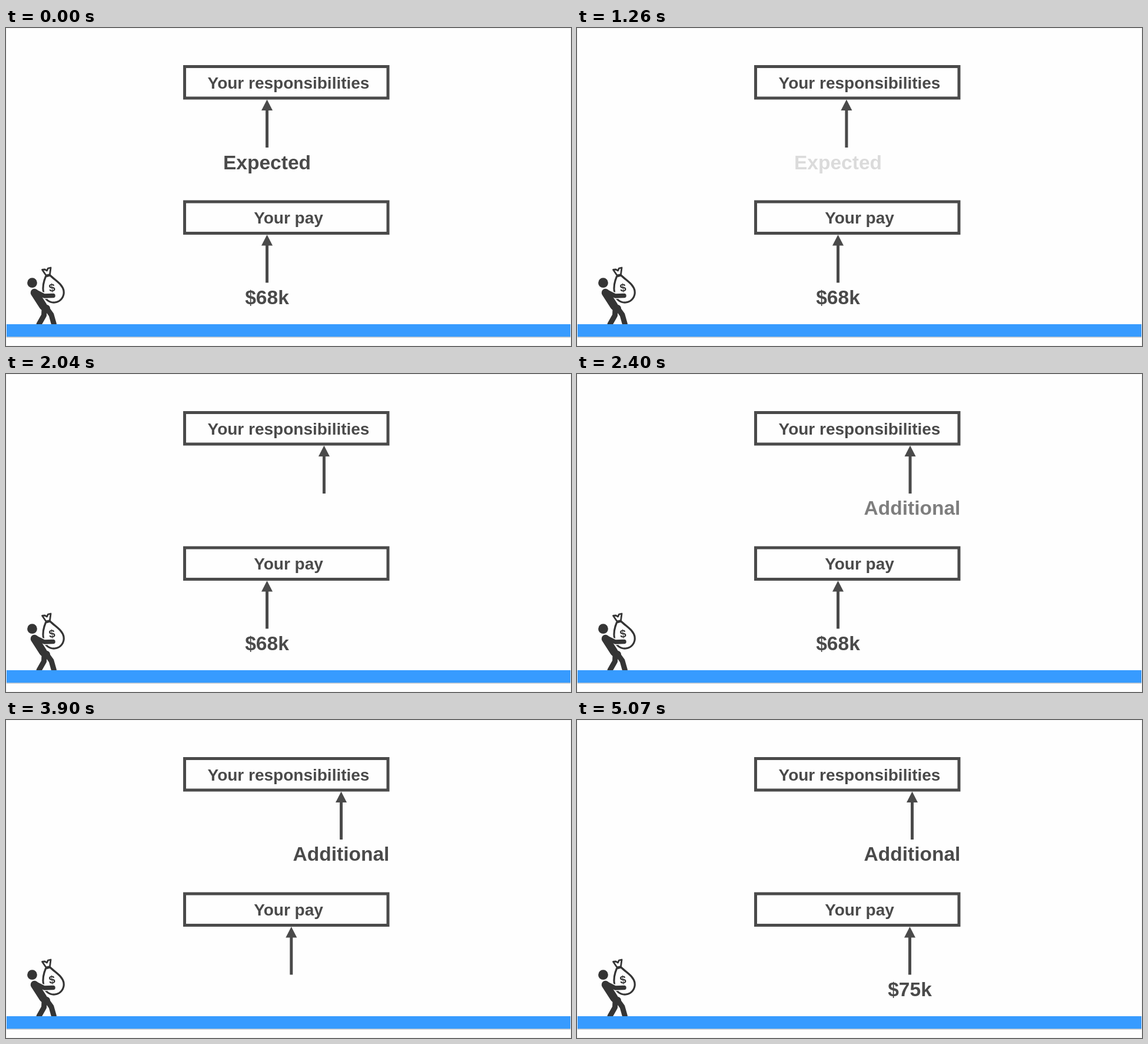
Write an HTML page with a canvas that moves like this. It is 960 by 540 pixels and loops after 5.79 s.

```html
<!DOCTYPE html>
<html lang="en">
<head>
<meta charset="utf-8">
<title>Responsibilities and pay</title>
<style>
  html, body { margin: 0; width: 100%; height: 100%; overflow: hidden; background: #fefefe; }
  canvas { display: block; width: 960px; height: 540px; }
</style>
</head>
<body>
<canvas id="stage" width="960" height="540"></canvas>
<script>
const ctx = document.getElementById('stage').getContext('2d');
const LOOP = 5790;
const INK = '#4a4a4a';
const FIGURE = '#353535';
const PAPER = '#fefefe';
const FONT = '"Liberation Sans", Arial, Helvetica, sans-serif';

// Sine ease in and out, 0 before start and 1 after end
function ease(t, start, end) {
  const u = Math.min(1, Math.max(0, (t - start) / (end - start)));
  return (1 - Math.cos(Math.PI * u)) / 2;
}

const mix = (a, b, u) => a + (b - a) * u;

function label(text, x, y, size, alpha = 1) {
  if (alpha <= 0) return;
  ctx.globalAlpha = alpha;
  ctx.fillStyle = INK;
  ctx.font = `bold ${size}px ${FONT}`;
  ctx.textAlign = 'center';
  ctx.fillText(text, x, y);
  ctx.globalAlpha = 1;
}

function box(text, top) {
  ctx.strokeStyle = INK;
  ctx.lineWidth = 5;
  ctx.lineJoin = 'miter';
  ctx.strokeRect(303.5, top + 2.5, 345.5, 53.5);
  label(text, 480, top + 39.5, 28);
}

function arrow(x, tip) {
  ctx.fillStyle = INK;
  ctx.fillRect(x - 2.5, tip + 17, 5, 64.5);
  ctx.beginPath();
  ctx.moveTo(x, tip);
  ctx.lineTo(x + 9.5, tip + 18.5);
  ctx.lineTo(x - 9.5, tip + 18.5);
  ctx.fill();
}

function line(path, width, color) {
  ctx.strokeStyle = color;
  ctx.lineWidth = width;
  ctx.stroke(new Path2D(path));
}

function bag() {
  line('M67.5 422 C64 430 62 440 63.5 449 C65 461 74 467 83 466 C93 465 99.5 456 98 446 C96 435 84 429 75 420 Z', 3.2, FIGURE);
  line('M68 420 L61.5 410.5 L66 410 L69.5 412 L71.5 408 L76 407 L74.5 418.5 Z', 2.8, FIGURE);
  ctx.save();
  ctx.translate(78, 441);
  ctx.rotate(-0.14);
  ctx.fillStyle = FIGURE;
  ctx.font = `bold 19px ${FONT}`;
  ctx.textAlign = 'center';
  ctx.fillText('$', 0, 6.5);
  ctx.restore();
}

function carrier() {
  ctx.lineJoin = ctx.lineCap = 'round';
  bag();
  const arm = 'M50 447.5 L65 455 L80 454.5';
  line(arm, 10.5, PAPER);
  line('M49 450 L63 472', 16, PAPER);
  line(arm, 7.5, FIGURE);
  line('M48.5 449.5 L63 472', 13.5, FIGURE);
  line('M64 474 L69 476', 12, FIGURE);
  line('M65 477 L64.5 488 L56 503', 9, FIGURE);
  line('M69 476 L77 487 L81.5 503', 9, FIGURE);
  ctx.fillStyle = FIGURE;
  ctx.beginPath();
  ctx.arc(44.5, 432.7, 8.4, 0, 2 * Math.PI);
  ctx.fill();
}

function ground() {
  ctx.fillStyle = PAPER;
  ctx.fillRect(0, 503, 960, 37);
  ctx.fillStyle = '#379bff';
  ctx.fillRect(0, 503, 960, 21.5);
  ctx.fillStyle = '#b4b4b4';
  ctx.fillRect(0, 524.5, 960, 1);
}

function draw(t) {
  ctx.fillStyle = PAPER;
  ctx.fillRect(0, 0, 960, 540);
  carrier();
  ground();
  ctx.strokeStyle = '#f1f1f1';
  ctx.lineWidth = 1;
  ctx.lineJoin = 'miter';
  ctx.strokeRect(0.5, 0.5, 959, 539);

  box('Your responsibilities', 63);
  box('Your pay', 292.5);

  arrow(mix(443.5, 569.5, ease(t, 890, 2580)), 121.5);
  label('Expected', 443.5, 239.5, 33.5, 1 - ease(t, 850, 1430));
  label('Additional', 569.5, 239, 33.5, ease(t, 2030, 2610));

  arrow(mix(443.5, 565.5, ease(t, 3245, 4905)), 351);
  label('$68k', 443.5, 469, 33.5, 1 - ease(t, 3180, 3750));
  label('$75k', 565.5, 469, 33.5, ease(t, 4350, 4920));
}

const began = performance.now();
function tick() {
  draw((performance.now() - began) % LOOP);
  requestAnimationFrame(tick);
}
tick();
</script>
</body>
</html>
```
